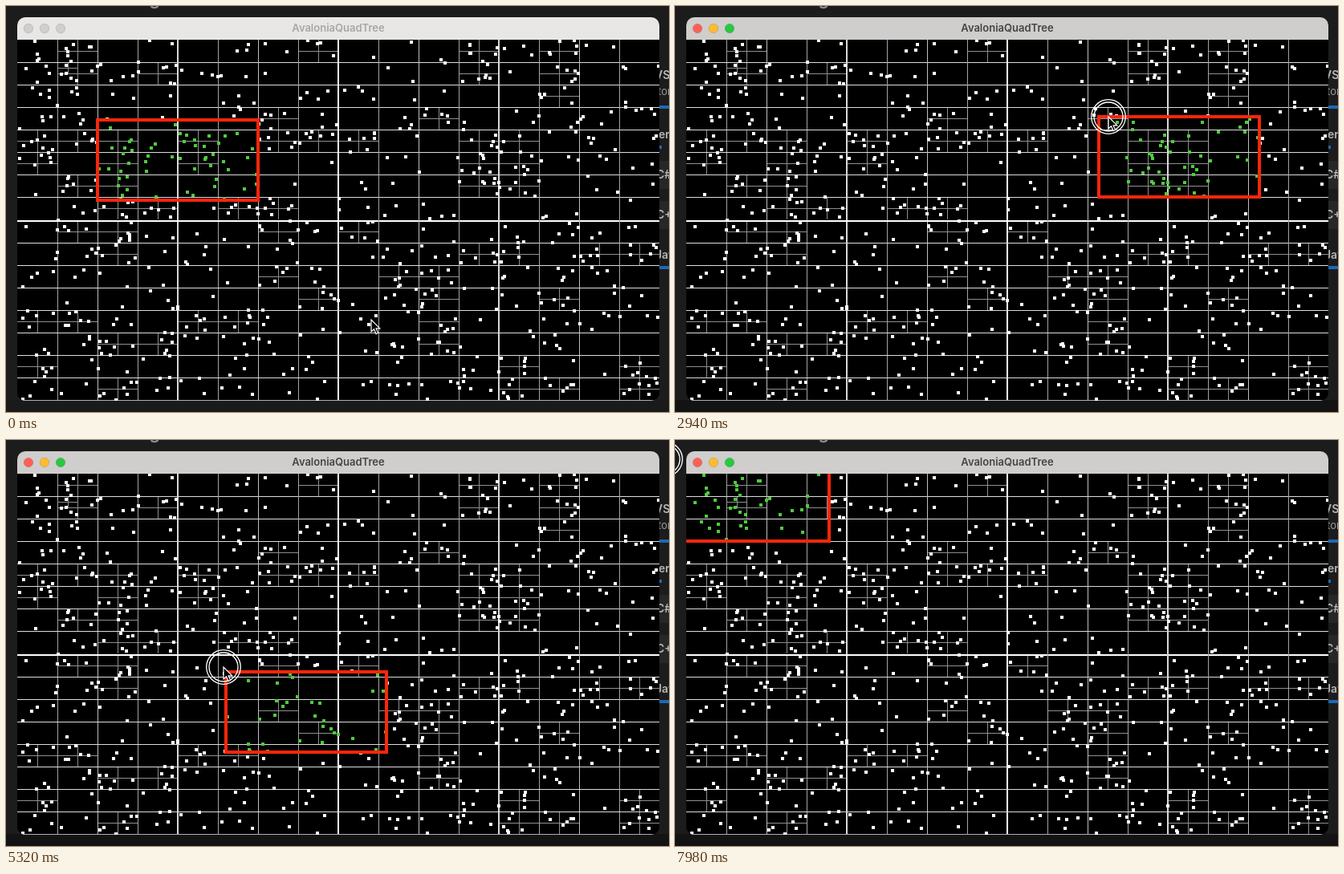
An HTML page with a canvas for the animation above (8000 ms loop, 826 px wide and 506 px high).

```html
<!DOCTYPE html>
<html lang="en">
<head>
<meta charset="utf-8">
<title>AvaloniaQuadTree</title>
<style>
html, body { margin: 0; width: 100%; height: 100%; overflow: hidden; background: #1c1c1c; }
canvas { display: block; }
</style>
</head>
<body>
<canvas id="stage" width="826" height="506"></canvas>
<script>
const ctx = document.getElementById('stage').getContext('2d');
const LOOP = 8000, STEP = 70, PRESS = 840, ACTIVE = 910;
const WIN = { x: 14, y: 14, w: 800, h: 478 };
const AREA = { x: 14, y: 42, w: 800, h: 449 };
const CELLS = 16, CW = AREA.w / CELLS, CH = AREA.h / CELLS;
const RANGE = { w: 200, h: 100 };
const START = { x: 114, y: 142 };

// Columns of the cells that split once more, row by row.
const SPLITS = [
  [1, 7, 11, 13], [1, 3, 11, 13], [13], [6, 10],
  [0, 1, 2, 4, 6, 7, 8, 11, 12], [0, 2, 4, 11, 12], [1, 2, 11, 12], [2, 3, 5, 6],
  [1, 2, 6, 8], [2, 11, 12, 14, 15], [6, 9, 10], [7, 10, 13],
  [0, 1, 4, 5, 10], [2, 3, 10], [0, 12, 15], [2, 12, 13, 15]
];

// Pointer path: time, x, y.
const PATH = [
  [0, 455, 391], [250, 400, 335], [560, 190, 165], [840, 99, 93],
  [1100, 140, 130], [1450, 290, 245], [1750, 385, 222], [1960, 400, 202],
  [2500, 457, 165], [2800, 528, 138], [2870, 528, 138], [2940, 540, 138],
  [3300, 650, 165], [3700, 735, 265], [4150, 700, 362], [4410, 650, 382],
  [4480, 641, 386], [4700, 585, 402], [5000, 390, 360], [5250, 274, 289],
  [5320, 271, 283], [5750, 165, 225], [6230, 49, 155], [6510, 46, 83],
  [6580, 46, 80], [7070, 32, 31], [7350, 31, 26], [7420, 31, 26],
  [7700, -8, 26], [7910, -8, 26], [7980, -12, 24]
];

function seeded(seed) {
  return () => {
    seed = (seed + 0x6D2B79F5) | 0;
    let n = Math.imul(seed ^ (seed >>> 15), 1 | seed);
    n = (n + Math.imul(n ^ (n >>> 7), 61 | n)) ^ n;
    return ((n ^ (n >>> 14)) >>> 0) / 4294967296;
  };
}

function scatter() {
  const random = seeded(41), points = [];
  for (let row = 0; row < CELLS; row++) {
    for (let col = 0; col < CELLS; col++) {
      const split = SPLITS[row].includes(col);
      const count = split ? 5 + Math.floor(random() * 3) : Math.floor(random() * 5);
      for (let i = 0; i < count; i++) {
        points.push({
          x: Math.round(AREA.x + (col + random()) * CW),
          y: Math.round(AREA.y + (row + random()) * CH)
        });
      }
    }
  }
  return points;
}
const points = scatter();

function slope(i, axis) {
  if (i < 1 || i >= PATH.length - 1) return 0;
  const [a, b, c] = [PATH[i - 1], PATH[i], PATH[i + 1]];
  const before = (b[axis] - a[axis]) / (b[0] - a[0]);
  const after = (c[axis] - b[axis]) / (c[0] - b[0]);
  return before * after <= 0 ? 0 : 2 * before * after / (before + after);
}

// Monotone cubic interpolation, so that pauses stay still.
function pointerAt(t) {
  let i = 0;
  while (i < PATH.length - 2 && t >= PATH[i + 1][0]) i++;
  const a = PATH[i], b = PATH[i + 1], span = b[0] - a[0], u = (t - a[0]) / span;
  const mix = axis =>
    a[axis] * (1 + 2 * u) * (1 - u) ** 2 + b[axis] * u * u * (3 - 2 * u) +
    span * (slope(i, axis) * u * (1 - u) ** 2 - slope(i + 1, axis) * u * u * (1 - u));
  return { x: Math.round(mix(1)), y: Math.round(mix(2)) };
}

function rect(color, x, y, w, h) {
  ctx.fillStyle = color;
  ctx.fillRect(x, y, w, h);
}

function text(value, x, y, font, color, align = 'left') {
  ctx.font = font;
  ctx.fillStyle = color;
  ctx.textAlign = align;
  ctx.fillText(value, x, y);
}

function circle(x, y, r) {
  ctx.beginPath();
  ctx.arc(x, y, r, 0, Math.PI * 2);
}

function drawBackdrop(active) {
  rect('#1c1c1c', 0, 0, 826, 506);
  text('Coding stories', 118, -1, 'bold 21px Inter, sans-serif', '#8c8c8c');
  rect('#272727', 814, 193, 12, 35);
  rect('#272727', 814, 243, 12, 35);
  const bold = '600 14px Inter, sans-serif';
  text('VS', 808, 91, bold, '#b8b8b8');
  text('tor', 812, 111, '13px Inter, sans-serif', '#9a9a9a');
  text('er', 813, 165, bold, '#b8b8b8');
  text('C#', 810, 215, bold, '#b8b8b8');
  text('C++', 810, 265, bold, '#b8b8b8');
  text('Java', 809, 315, bold, '#b8b8b8');
  rect('#1d69b5', 814, 124, 12, 4);
  rect('#1d69b5', 814, 174, 3, 4);
  rect('#1d69b5', 814, 324, 12, 4);
  rect(`rgba(0,0,0,${active ? 0.32 : 0.08})`, 0, 491, 826, 15);
}

function drawTitleBar(active) {
  rect(active ? '#cfcecd' : '#e8e7e5', WIN.x, WIN.y, WIN.w, 28);
  ['#ff5f57', '#febc2e', '#28c840'].forEach((color, i) => {
    circle(28 + i * 20, 28, 5.75);
    ctx.fillStyle = active ? color : '#cfcecc';
    ctx.fill();
    ctx.lineWidth = 0.7;
    ctx.strokeStyle = active ? 'rgba(0,0,0,.18)' : '#b6b5b3';
    ctx.stroke();
  });
  text('AvaloniaQuadTree', 414, 32, '600 13px Inter, sans-serif',
    active ? '#454443' : '#a8a7a5', 'center');
}

function drawCross(x, y, w, h) {
  rect('#8e8e8e', Math.round(x + w / 2), Math.round(y), 1, Math.round(h));
  rect('#8e8e8e', Math.round(x), Math.round(y + h / 2), Math.round(w), 1);
}

function drawGrid() {
  SPLITS.forEach((cols, row) => cols.forEach(col =>
    drawCross(AREA.x + col * CW, AREA.y + row * CH, CW, CH)));
  drawCross(64, AREA.y + CH, CW / 2, CH / 2);
  for (let i = 1; i < CELLS; i++) {
    const x = AREA.x + i * CW, y = Math.round(AREA.y + i * CH);
    const shade = i % 8 === 0 ? '#fff' : i % 4 === 0 ? '#d8d8d8' : i % 2 === 0 ? '#c0c0c0' : '#a4a4a4';
    rect(shade, i % 4 ? x : x - 1, AREA.y, i % 4 ? 1 : 2, AREA.h);
    rect(i % 8 ? '#dcdcdc' : '#fff', AREA.x, y, AREA.w, i % 8 ? 1 : 2);
  }
  rect('#b0b0b0', AREA.x, 491, AREA.w, 1);
}

function drawPoints(box) {
  for (const { x, y } of points) {
    const inside = x >= box.x && x <= box.x + RANGE.w && y >= box.y && y <= box.y + RANGE.h;
    rect(inside ? '#50ca40' : '#fff', x - 2, y - 2, 4, 4);
  }
}

function drawRange(box) {
  ctx.lineWidth = 4;
  ctx.strokeStyle = '#fb260b';
  ctx.strokeRect(box.x, box.y, RANGE.w, RANGE.h);
}

function drawPointer({ x, y }, pressed) {
  if (pressed) {
    ctx.strokeStyle = '#fff';
    ctx.lineWidth = 1.3;
    for (const r of [21.3, 18]) {
      circle(x, y, r);
      ctx.stroke();
    }
  }
  ctx.save();
  ctx.translate(x, y);
  ctx.beginPath();
  ctx.moveTo(0, 0);
  ctx.lineTo(0, 15);
  ctx.lineTo(3.5, 11.8);
  ctx.lineTo(6, 17.6);
  ctx.lineTo(8.6, 16.5);
  ctx.lineTo(6.1, 10.9);
  ctx.lineTo(10.8, 10.9);
  ctx.closePath();
  ctx.fillStyle = '#000';
  ctx.fill();
  ctx.lineWidth = 1.2;
  ctx.strokeStyle = '#fff';
  ctx.stroke();
  ctx.restore();
}

function draw(t) {
  const active = t >= ACTIVE;
  // The range follows the pointer one step behind.
  const box = active ? pointerAt(t - STEP) : START;
  drawBackdrop(active);
  ctx.save();
  ctx.beginPath();
  ctx.roundRect(WIN.x, WIN.y, WIN.w, WIN.h, 10);
  ctx.clip();
  rect('#000', WIN.x, WIN.y, WIN.w, WIN.h);
  ctx.save();
  ctx.beginPath();
  ctx.rect(AREA.x, AREA.y, AREA.w, AREA.h + 1);
  ctx.clip();
  drawGrid();
  drawPoints(box);
  drawRange(box);
  ctx.restore();
  drawTitleBar(active);
  ctx.restore();
  drawPointer(pointerAt(t), t >= PRESS);
}

function frame() {
  const t = performance.now() % LOOP;
  draw(Math.floor(t / STEP) * STEP);
  requestAnimationFrame(frame);
}
frame();
</script>
</body>
</html>
```
